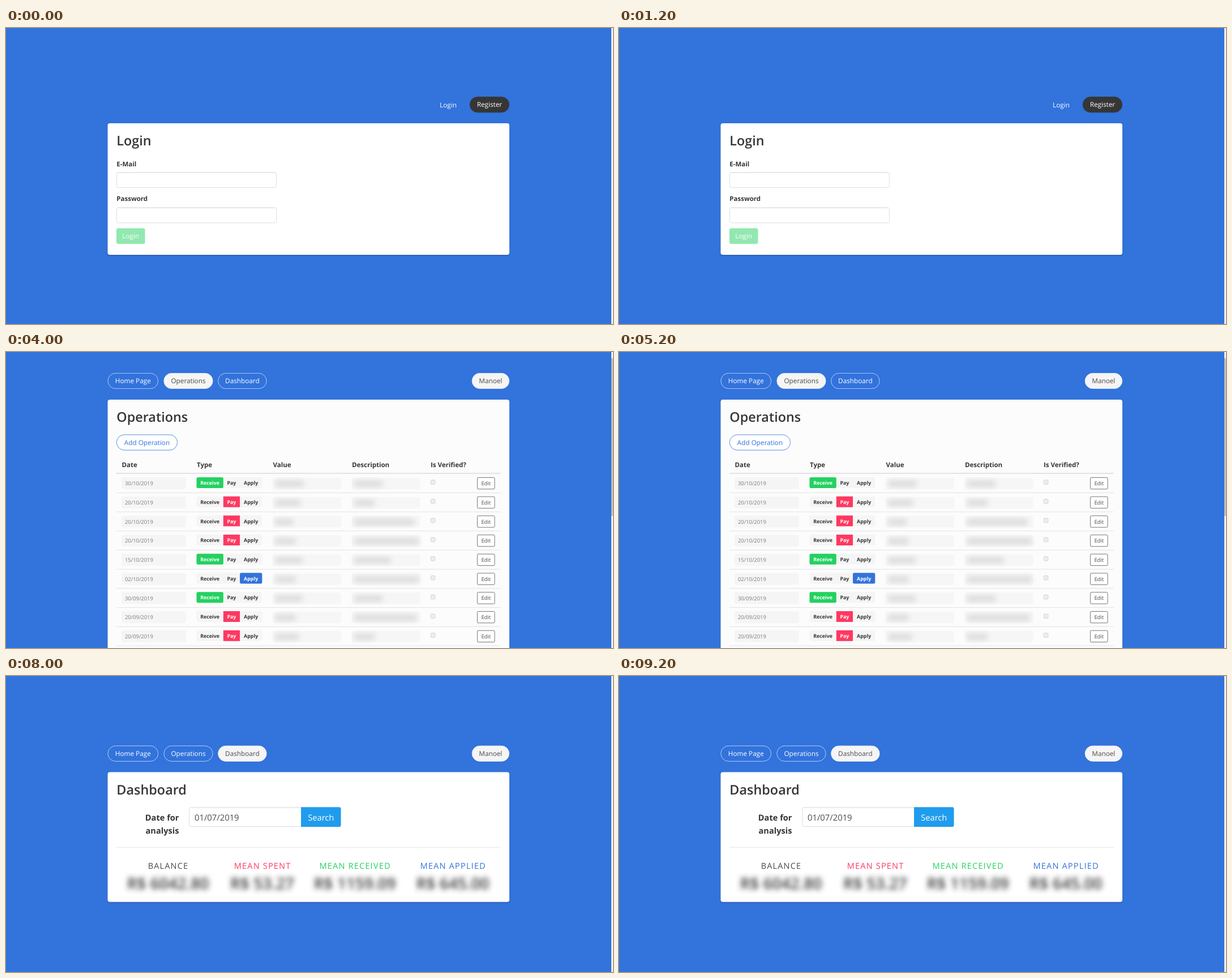
An HTML page for the animation above (10 s loop, 1072x522 px).

```html
<!DOCTYPE html>
<html lang="en">
<head>
<meta charset="utf-8">
<title>Finance app tour</title>
<style>
  html, body { margin: 0; width: 100%; height: 100%; overflow: hidden; background: #3273dc; }
  svg { display: block; font-family: "Open Sans", "Noto Sans", sans-serif; text-rendering: geometricPrecision; }
  .scene { opacity: 0; animation: show 10s step-end infinite; }
  @keyframes show { 0% { opacity: 1; } 20%, 100% { opacity: 0; } }
</style>
</head>
<body>
<svg id="stage" width="1072" height="522" viewBox="0 0 1072 522" xmlns="http://www.w3.org/2000/svg">
  <defs>
    <filter id="smudge" x="-20%" y="-60%" width="140%" height="220%"><feGaussianBlur stdDeviation="5"/></filter>
    <filter id="amount" x="-20%" y="-60%" width="140%" height="220%"><feGaussianBlur stdDeviation="4.6"/></filter>
    <filter id="soft" x="-5%" y="-20%" width="110%" height="150%"><feGaussianBlur stdDeviation="1.2"/></filter>
  </defs>
</svg>
<script>
const BLUE = '#3273dc', GREEN = '#23d160', RED = '#ff3860', SKY = '#209cee';
const DARK = '#363636', BODY = '#4a4a4a', PALE = '#f5f5f5', EDGE = '#dbdbdb';
const USER = 'Manoel';

const attrs = o => Object.entries(o).map(([k, v]) => `${k}="${v}"`).join(' ');
const rect = (x, y, w, h, o) => `<rect ${attrs({ x, y, width: w, height: h, ...o })}/>`;
const text = (x, y, s, o = {}) =>
  `<text ${attrs({ x, y, 'font-size': 11.75, fill: BODY, ...o })}>${s}</text>`;
const path = (d, stroke, width = 1) =>
  `<path d="${d}" fill="none" stroke="${stroke}" stroke-width="${width}"/>`;
const centred = (x, y, s, o) => text(x, y, s, { 'text-anchor': 'middle', ...o });
const label = (x, y, s, o) => text(x, y, s, { 'font-size': 11.5, 'font-weight': 700, fill: DARK, ...o });

function pill(x, y, w, s, fill, color, stroke = fill) {
  return rect(x + .4, y + .4, w - .8, 27.2, { rx: 13.6, fill, stroke, 'stroke-width': .8 }) +
    centred(x + w / 2, y + 18.2, s, { fill: color });
}

function nav(y, active) {
  const tabs = [['Home Page', 179.5, 89.5], ['Operations', 278.5, 87], ['Dashboard', 374.2, 86.3]];
  return tabs.map(([s, x, w], i) => i === active
    ? pill(x, y, w, s, PALE, BODY)
    : pill(x, y, w, s, 'none', '#fff', '#d5e1f6')).join('') +
    pill(822.7, y, 66.3, USER, PALE, BODY);
}

function card(y, h, title, fill = '#fff') {
  return rect(179.5, y + 1, 709.5, h + .6, { rx: 4, fill: '#0a0a0a', opacity: .22, filter: 'url(#soft)' }) +
    rect(179.5, y, 709.5, h, { rx: 4, fill }) +
    text(195.3, y + 39.3, title, { 'font-size': 23.4, 'font-weight': 600, fill: DARK });
}

function field(x, y, w, h = 28) {
  return rect(x + .5, y + .5, w - 1, h - 1, { rx: 3, fill: '#fff', stroke: EDGE, 'stroke-width': .9 }) +
    path(`M${x + 2} ${y + 1.4}h${w - 4}`, '#ececec');
}

function button(x, y, w, s, fill, h = 27.5) {
  return rect(x, y, w, h, { rx: 3, fill }) + centred(x + w / 2, y + h / 2 + 4.3, s, { fill: '#fff' });
}

const checkbox = (x, y, stroke) =>
  rect(x + .5, y + .5, 7.5, 7.5, { rx: 1.5, fill: '#eee', stroke, 'stroke-width': .9 });

const login = () =>
  centred(781, 140.2, 'Login', { fill: '#fff' }) +
  pill(818.7, 121.2, 70.3, 'Register', DARK, '#fff') +
  card(168, 232, 'Login') +
  label(195.3, 243.5, 'E-Mail') + field(195, 254, 283) +
  label(195.3, 305.3, 'Password') + field(195, 316.2, 283) +
  button(195, 353.3, 50.5, 'Login', '#91e8b0');

const home = () =>
  nav(190, 0) + card(237, 95, 'Home') + text(195.3, 312.5, 'Welcome!') +
  rect(897.5, 6, 165.5, 49.5, { rx: 3, fill: GREEN }) +
  text(916, 36, "You're now logged in", { fill: '#fff' }) +
  `<circle cx="1048.2" cy="20.2" r="7.8" fill="#0a0a0a" opacity=".25"/>` +
  path('M1045.4 17.4l5.6 5.6m0-5.6l-5.6 5.6', '#fff', 1.6);

// date, selected type, width of hidden value, width of hidden description
const rows = [
  ['30/10/2019', 0, 50, 50], ['20/10/2019', 1, 44, 36], ['20/10/2019', 1, 32, 106],
  ['20/10/2019', 1, 36, 114], ['15/10/2019', 0, 48, 64], ['02/10/2019', 2, 36, 114],
  ['30/09/2019', 0, 48, 50], ['20/09/2019', 1, 36, 110], ['20/09/2019', 1, 42, 36]
];
const types = [['Receive', 336.5, 47.3, GREEN], ['Pay', 383.8, 29.2, RED], ['Apply', 413, 39.3, BLUE]];

function tags(y, chosen) {
  return rect(336.5, y, 115.8, 19, { rx: 3, fill: PALE }) +
    types.map(([s, x, w, color], i) =>
      (i === chosen ? rect(x, y, w, 19, { rx: i === 1 ? 0 : 2.5, fill: color }) : '') +
      centred(x + w / 2, y + 13.2, s,
        { 'font-size': 8.9, 'font-weight': 700, fill: i === chosen ? '#fff' : DARK })).join('');
}

const hidden = (x, y, w) =>
  rect(x, y, 120.5, 20, { rx: 3, fill: '#f6f6f6' }) +
  rect(x + 4, y + 5, w, 11, { fill: '#dcdcdc', filter: 'url(#smudge)' });

function row([date, type, value, note], i) {
  const y = 214.4 + 33.73 * i;
  return rect(204, y + 6.8, 114, 20.6, { rx: 3, fill: PALE }) +
    text(210, y + 20.8, date, { 'font-size': 9.4, fill: '#7a7a7a' }) +
    tags(y + 6.5, type) +
    hidden(471.5, y + 7.5, value) + hidden(611, y + 7.5, note) +
    checkbox(749.8, y + 11, '#cfcfcf') +
    rect(832.4, y + 7, 30.6, 20.3, { rx: 1.8, fill: '#fff', stroke: '#555', 'stroke-width': .8 }) +
    centred(847.7, y + 20.7, 'Edit', { 'font-size': 9.4 }) +
    path(`M195 ${y + 33.8}h678.5`, '#e0e0e0', .9);
}

const operations = () =>
  nav(37, 1) + card(84, 460, 'Operations', '#fcfcfc') +
  pill(195, 145.5, 108, 'Add Operation', '#fff', BLUE, BLUE) +
  [['Date', 204.5], ['Type', 337], ['Value', 471.5], ['Description', 611], ['Is Verified?', 750]]
    .map(([s, x]) => label(x, 203, s)).join('') +
  path('M195 214h678.5', EDGE, 1.5) +
  rows.map(row).join('') +
  rect(1069, 11, 3, 278, { fill: '#c1c1c1' });

const addOperation = () =>
  nav(78, -1) + card(125, 319, 'Add Operation') +
  label(195.3, 200.5, 'Operation Description') + field(195, 211.2, 678.5) +
  label(195.3, 262.5, 'Value in R$') + field(195, 273.3, 154.5) +
  text(203, 291.8, 'R$ 0,00', { fill: '#c6c6c6' }) +
  rect(349, 273.8, 81, 27, { rx: 3, fill: '#fff', stroke: EDGE, 'stroke-width': .9 }) +
  text(356.5, 291.6, 'Pay') + path('M407.3 285l4.6 4.6l4.6-4.6', BLUE, 2.2) +
  label(195.3, 324.8, 'Date that will occur') + field(195, 335.3, 678.5) +
  text(203.3, 353.8, 'dd/mm/aaaa') +
  checkbox(195, 376.8, '#aaa') + text(204.6, 386.5, 'Verified') +
  button(195, 400.8, 43, 'Add', BLUE) +
  text(257, 419, 'Go Back', { 'text-decoration': 'underline' });

const totals = [
  ['BALANCE', 286, BODY, 'R$ 6042.80'], ['MEAN SPENT', 452.5, RED, 'R$ 53.27'],
  ['MEAN RECEIVED', 616, GREEN, 'R$ 1159.09'], ['MEAN APPLIED', 789, BLUE, 'R$ 645.00']
];

const dashboard = () =>
  nav(122.8, 2) + card(169.5, 229, 'Dashboard') +
  ['Date for', 'analysis'].map((s, i) =>
    label(305.5, 255 + 23.3 * i, s, { 'font-size': 14.6, 'text-anchor': 'end' })).join('') +
  field(323.3, 231.3, 200, 34.7) + text(333, 255, '01/07/2019', { 'font-size': 14.8 }) +
  `<path d="M521 231.3h67.5a3 3 0 0 1 3 3v28.6a3 3 0 0 1-3 3H521z" fill="${SKY}"/>` +
  centred(556.3, 255, 'Search', { 'font-size': 14.7, fill: '#fff' }) +
  path('M195 302.3h678.5', '#ededed', 1.4) +
  totals.map(([s, x, fill, sum]) =>
    centred(x + .6, 339.8, s, { 'font-size': 14.5, 'letter-spacing': 1.2, fill }) +
    centred(x, 376, sum, { 'font-size': 28, 'font-weight': 600, fill: DARK, filter: 'url(#amount)' })).join('');

const scenes = [login, home, operations, addOperation, dashboard];
document.getElementById('stage').innerHTML +=
  rect(0, 0, 1072, 522, { fill: BLUE }) + rect(1069, 0, 3, 522, { fill: '#f1f1f1' }) +
  scenes.map((draw, i) =>
    `<g class="scene" style="animation-delay:${2 * i - 10}s">${draw()}</g>`).join('');
</script>
</body>
</html>
```
